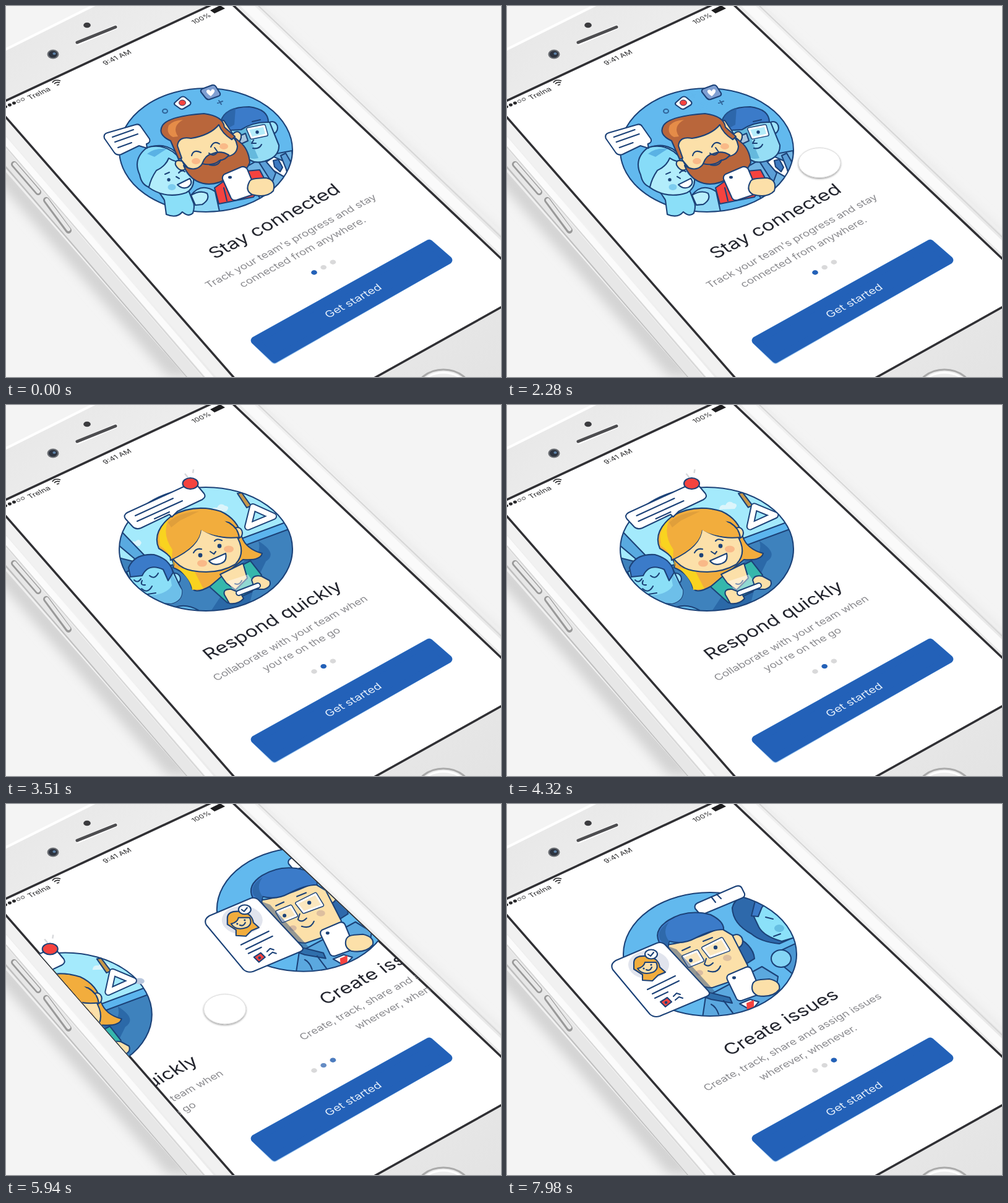
These frames come from a looping animation (800x600 px, 8 s). An HTML page:

```html
<!DOCTYPE html>
<html lang="en">
<head>
<meta charset="utf-8">
<title>Onboarding</title>
<style>
  html, body { margin: 0; width: 100%; height: 100%; overflow: hidden; background: #f4f4f4; }
  svg { display: block; width: 800px; height: 600px; }
  text { font-family: Inter, Roboto, sans-serif; text-anchor: middle; }
  .title { font-size: 31.5px; fill: #23252e; }
  .sub { font-size: 17.9px; fill: #8b8b8f; }
  .status { font-size: 12.6px; fill: #2a2a2c; }
  .ink { stroke: #1c4278; stroke-width: 2.1; stroke-linejoin: round; stroke-linecap: round; }
  .line { fill: none; }
  .dot { fill: #1c4278; }
  .skin { fill: #fce0a9; }
  .cheek { fill: #f9b988; }
  .navy { fill: #3b7bc9; }
  .brown { fill: #b9663b; }
  .gold { fill: #f2ad3d; }
  .pale { fill: #9fe5fa; }
  .white { fill: #fff; }
  .red { fill: #f5433f; }
  .rim { fill: none; stroke: #1c4278; stroke-width: 6; stroke-linejoin: round; }
  .frame { stroke: #fff; stroke-width: 3; stroke-linejoin: round; }
</style>
</head>
<body>
<svg viewBox="0 0 800 600">
  <defs>
    <linearGradient id="face" x1="0" y1="0" x2="1" y2="1">
      <stop offset="0" stop-color="#e6e6e6"/><stop offset=".4" stop-color="#f3f3f3"/><stop offset="1" stop-color="#e3e3e3"/>
    </linearGradient>
    <filter id="soft" x="-30%" y="-30%" width="160%" height="160%"><feGaussianBlur stdDeviation="9"/></filter>
    <filter id="lift" x="-30%" y="-30%" width="160%" height="170%">
      <feDropShadow dx="0" dy="1.5" stdDeviation="1.7" flood-color="#000" flood-opacity=".4"/>
    </filter>
    <clipPath id="screen"><path d="M-15 163 330 0H368L800 408V487L597 600H367Z"/></clipPath>
    <clipPath id="disc"><ellipse cx="323" cy="233" rx="140" ry="100"/></clipPath>
    <clipPath id="disc3"><ellipse cx="328" cy="243" rx="140" ry="100"/></clipPath>
    <path id="clerkLens" d="M391 199 417 194 421 208 397 213Z"/>
    <path id="heroLenses" d="M285 247 307 238 316 253 294 262ZM317 233 347 218 358 236 328 247Z"/>
    <path id="strapRing" d="M399 165 432 180 391 197Z"/>
  </defs>

  <!-- Phone body -->
  <path d="M-30 265 262 600H310L-30 220Z" fill="#d3d3d3" filter="url(#soft)"/>
  <path d="M395-8 820 386V412L395 16Z" fill="#e2e2e2" filter="url(#soft)"/>
  <path d="M-10 76 148-6H408L806 373V606H296L-10 257Z" fill="url(#face)"/>
  <g fill="none">
    <path d="M-6 73 148-4" stroke="#fff" stroke-width="4"/>
    <path d="M-5 254 299 606" stroke="#bfbfbf" stroke-width="4"/>
    <path d="M-5 239 310 606" stroke="#e7e7e7" stroke-width="18"/>
    <path d="M-5 222 325 606" stroke="#d6d6d6" stroke-width="2"/>
    <path d="M-5 213 334 606" stroke="#fbfbfb" stroke-width="10"/>
    <path d="M-5 190 357 606" stroke="#f1f1f1" stroke-width="18"/>
    <path d="M384-6 806 396" stroke="#fafafa" stroke-width="16"/>
    <path d="M402-6 806 379" stroke="#d6d6d6" stroke-width="2"/>
    <path d="M408-6 806 373" stroke="#efefef" stroke-width="4"/>
    <g stroke-linecap="round">
      <path d="M13 256 52 301M65 314 101 363" stroke="#999" stroke-width="10"/>
      <path d="M14 256 52 300M66 314 101 361" stroke="#e9e9e9" stroke-width="6"/>
      <path d="M116 60 177 34" stroke="#fff" stroke-width="7"/>
      <path d="M115 59 177 34" stroke="#4d4d50" stroke-width="5"/>
    </g>
  </g>
  <ellipse cx="76" cy="78" rx="9.5" ry="7.5" fill="#6a6d72"/>
  <ellipse cx="76" cy="78" rx="7" ry="5.6" fill="#2d333f"/>
  <ellipse cx="78" cy="77" rx="2.6" ry="2" fill="#5e82a8"/>
  <ellipse cx="131" cy="31" rx="5.8" ry="4.3" fill="#3b3b3e"/>
  <ellipse cx="707" cy="624" rx="45" ry="36" fill="#ededed" stroke="#aaa" stroke-width="3"/>
  <ellipse cx="707" cy="626" rx="41" ry="33" fill="none" stroke="#fff" stroke-width="3"/>
  <path d="M-15 163-15 160 345-8H360L806 414V484L591 604H371Z" fill="#fff" stroke="#303034" stroke-width="3.5"/>

  <!-- Status bar -->
  <g class="status">
    <g fill="#2a2a2c"><ellipse cx="-1" cy="163" rx="3" ry="2.4"/><ellipse cx="6" cy="160" rx="3" ry="2.4"/><ellipse cx="13" cy="157" rx="3" ry="2.4"/></g>
    <g fill="none" stroke="#2a2a2c" stroke-width=".8"><ellipse cx="20" cy="154" rx="2.8" ry="2.2"/><ellipse cx="27" cy="151" rx="2.8" ry="2.2"/></g>
    <text transform="matrix(.905 -.425 .6 .62 56 144)" font-size="13">Trelna</text>
    <g fill="none" stroke="#2a2a2c" stroke-width="1.7"><path d="M75 124Q78 118 88 121M78 126Q81 122 87 124"/><path d="M82 128 86 127"/></g>
    <text transform="matrix(.905 -.425 .6 .62 182 86)">9:41 AM</text>
    <text transform="matrix(.905 -.425 .6 .62 318 23)" font-size="12">100%</text>
    <path d="M330 7 346-1 354 4 337 12Z" fill="#1d1d1f"/>
  </g>

  <g clip-path="url(#screen)">
    <!-- Page 1 -->
    <g class="art">
      <ellipse cx="323" cy="233" rx="140" ry="100" fill="#62b9ee"/>
      <g clip-path="url(#disc)">
        <path class="ink" d="M385 262 420 242 462 234 470 290 420 330Z" fill="#72b5e4"/>
        <path class="ink white" d="M415 256 433 244 451 252 456 280Z"/>
        <path class="ink" d="M432 250 440 248 447 261 443 268 434 260Z" fill="#3d7ac1"/>
        <path class="ink" d="M409 253 419 250 436 270 430 286ZM444 242 452 238 466 262 456 272Z" fill="#5b9fd8"/>
        <path class="ink" d="M299 306Q315 285 338 300L345 332 290 335Z" fill="#8ed8f6"/>
      </g>
      <ellipse class="ink line" cx="323" cy="233" rx="140" ry="100"/>
      <!-- Man with glasses -->
      <g id="clerk">
        <ellipse class="ink pale" cx="430" cy="197" rx="9" ry="10"/>
        <path class="ink" d="M360 198Q395 179 426 188L441 225Q442 244 418 251 395 257 386 240Z" fill="#96def5"/>
        <path d="M366 200 386 194 408 246Q395 250 386 240Z" fill="#65b9dd"/>
        <path class="ink navy" d="M347 187Q354 163 393 163 424 167 424 188 400 187 380 200L362 201Z"/>
        <path d="M348 186Q354 167 371 165L369 192 360 197Z" fill="#275f9f" opacity=".7"/>
        <use href="#clerkLens" class="rim"/>
        <use href="#clerkLens" class="frame" fill="#b5edfa"/>
        <path class="ink" d="M373 212 387 206 391 218 378 224Z" fill="#a9c6de"/>
        <circle class="dot" cx="406" cy="204" r="2.7"/>
        <path class="ink line" d="M398 187 411 184M400 217 397 222 404 222M399 230Q409 232 413 224"/>
      </g>
      <!-- Woman -->
      <g id="friend">
        <path class="ink" d="M224 283Q245 294 256 314L259 337Q276 344 285 333 295 342 302 335 306 323 302 316L280 260Z" fill="#8bdff8"/>
        <path class="ink" d="M299 306Q314 297 325 303 330 313 317 321L306 322Z" fill="#b9effc"/>
        <path class="ink" d="M217 270Q207 245 228 230 258 218 278 240L298 262Q311 291 291 302 258 313 230 293Z" fill="#b2edfb"/>
        <path class="ink" d="M216 273Q204 247 228 229 250 222 270 236L288 252Q273 253 263 246 258 259 243 266 234 279 231 293 219 289 216 273Z" fill="#87dcf8"/>
        <path d="M228 239Q240 229 260 231L252 236 240 244Z" fill="#5ab2e4"/>
        <ellipse cx="268" cy="293" rx="6.5" ry="5" fill="#7cccef"/><ellipse cx="297" cy="269" rx="6" ry="5" fill="#7cccef"/>
        <circle class="dot" cx="263" cy="281" r="2.7"/>
        <path class="ink white" d="M277 289 297 279Q303 287 294 293 285 297 277 289Z"/>
        <path class="ink line" d="M279 270Q284 264 289 268M275 276 280 279M257 272 264 269"/>
      </g>
      <!-- Bearded man -->
      <g>
        <path class="ink red" d="M344 320 337 294 354 282 388 267 410 265 419 282 400 309Z"/>
        <path class="ink line" d="M352 294 357 315"/>
        <path class="ink skin" d="M285 251Q272 247 274 257 281 270 291 263Z"/>
        <path class="ink skin" d="M264 210Q290 193 352 185L382 230 365 270 306 276 284 250Z"/>
        <path class="ink skin" d="M365 209Q374 198 380 208 381 217 374 222Z"/>
        <path class="ink brown" d="M266 218Q244 208 253 193 263 178 320 174 351 178 353 196L370 211 365 216Q349 206 344 192 330 209 299 214 279 210 277 226L284 246 279 248Z"/>
        <path d="M270 212Q258 206 263 193 270 185 286 184 267 195 278 211Z" fill="#e58c48"/>
        <path class="ink brown" d="M287 258Q304 269 315 258L324 246Q336 238 344 239 354 234 358 243 373 241 374 227L370 213 378 220Q392 231 394 253 387 273 360 278 331 295 308 283 294 276 287 258Z"/>
        <path class="ink brown" d="M317 255Q322 241 333 239 347 233 360 241 356 248 345 250 335 259 317 255Z"/>
        <path class="ink line" d="M329 257Q343 260 347 249"/>
        <path class="ink line" d="M328 238Q335 245 342 236L337 229"/>
        <path class="ink line" d="M300 242Q303 231 315 237M331 228Q336 217 345 223"/>
        <ellipse class="cheek" cx="307" cy="251" rx="7" ry="5"/><ellipse class="cheek" cx="352" cy="227" rx="7" ry="5"/>
        <path class="ink white" d="M353 272 381 260Q387 259 390 264L404 298Q404 304 399 305L372 314Q365 315 363 309L350 280Q349 275 353 272Z"/>
        <ellipse class="dot" cx="362" cy="277" rx="3" ry="2.3"/>
        <path class="ink skin" d="M393 285Q386 299 398 305 421 311 432 299 437 281 420 278L404 279Q394 280 393 285Z"/>
      </g>
      <g id="bubble">
        <path class="ink white" d="M164 205 209 192Q215 190 218 195L232 215Q234 221 227 223L228 230 215 226 186 240Q179 242 175 237L159 214Q157 207 164 205Z"/>
        <path class="ink line" d="M172 212 206 200M176 220 213 207M181 229 203 221"/>
      </g>
      <path class="ink white" d="M273 156 282 148Q286 145 290 148L297 154Q300 157 297 160L287 166Q283 168 280 165L273 160Q271 158 273 156Z"/>
      <ellipse class="red" cx="285" cy="156.5" rx="5.5" ry="4.5" stroke="#273b6b"/>
      <path class="ink" d="M317 134 333 128Q337 127 339 130L346 141Q347 145 343 146L329 151Q325 152 322 148L315 139Q314 136 317 134Z" fill="#7f9fd2"/>
      <path class="white" d="M331 146Q321 139 325 136 328 134 331 138 332 133 336 135 340 138 331 146Z"/>
      <g id="sparksA" class="ink line" stroke-width="1.4"><ellipse cx="257" cy="170" rx="4" ry="3.2"/><path d="M342 157 350 154M344 153 348 159"/></g>
      <g id="sparksB">
        <path class="ink line" d="M297 146 305 143M299 142 303 148"/>
        <text transform="matrix(.905 -.425 .6 .62 319 165)" font-size="18" fill="#387ab7" opacity=".65">@</text>
      </g>
    </g>

    <!-- Page 2 -->
    <g class="art">
      <ellipse cx="323" cy="233" rx="140" ry="100" fill="#a4eafc"/>
      <g clip-path="url(#disc)">
        <path id="cloud" d="M331 173Q332 164 341 166 346 157 354 163 363 164 356 172Z" fill="#dcf5fb"/>
        <path id="cloudLeft" d="M202 227Q202 219 209 221 215 214 219 223L216 228Z" fill="#dcf5fb"/>
        <path class="ink" d="M170 244 250 264 370 230 470 195V350H170Z" fill="#3e82bd"/>
        <path class="ink" d="M370 220 470 183V196L370 233Z" fill="#5cb5ee"/>
        <path class="ink" d="M187 205 244 264H226L180 225Z" fill="#59aae0"/>
        <path d="M385 252Q415 245 408 220 440 240 420 253L402 290 390 335H330Z" fill="#2b69a8"/>
        <path class="ink" d="M262 333Q285 317 311 332V340H260Z" fill="#5fb3e5"/>
        <ellipse class="ink pale" cx="273" cy="281" rx="9" ry="9"/>
        <path class="ink" d="M195 270Q230 249 266 261L284 299Q286 316 267 321 225 321 203 288Z" fill="#8bdff7"/>
        <path d="M263 265 284 299Q286 316 267 321 235 320 222 308 258 309 268 292Z" fill="#6dbfe9"/>
        <path class="ink navy" d="M198 263Q208 240 239 242 265 249 270 271L262 284 254 266Q230 255 220 276L201 278Z"/>
        <path class="ink line" d="M207 283Q213 289 218 281M232 276Q240 283 246 272M220 284Q216 292 225 291M219 297Q229 306 236 293M229 306 242 304"/>
      </g>
      <ellipse class="ink line" cx="323" cy="233" rx="140" ry="100"/>
      <ellipse id="smudge" cx="443" cy="179" rx="8" ry="5" fill="#b9c7dd"/>
      <!-- Strap -->
      <g id="strap">
        <path class="ink" d="M374 143 381 142 396 163 389 166Z" fill="#c69648"/>
        <use href="#strapRing" fill="none" stroke="#1c4278" stroke-width="12" stroke-linejoin="round"/>
        <use href="#strapRing" fill="none" stroke="#fff" stroke-width="8" stroke-linejoin="round"/>
      </g>
      <!-- Woman with phone -->
      <g>
        <path class="ink gold" d="M247 232Q235 205 268 179 305 159 347 172 375 185 381 213 388 233 414 240 411 252 383 250L330 293Q302 309 299 291 293 272 270 263 275 248 247 232Z"/>
        <path d="M249 228Q240 205 266 184 253 211 271 232L270 261Q276 247 249 228ZM277 263Q300 284 301 299L319 297 304 268Z" fill="#f9d31f"/>
        <path class="ink" d="M329 294 351 275 395 252 413 275 397 302 358 320Z" fill="#35b7ac"/>
        <path class="ink skin" d="M346 274 383 256 390 280 371 299 356 288Z"/>
        <path class="ink line" d="M370 289Q377 292 381 284"/>
        <ellipse class="ink skin" cx="374" cy="207" rx="8" ry="9"/>
        <path class="ink skin" d="M269 248Q275 210 316 200 352 198 371 209 390 239 370 258 341 275 301 268 282 265 269 248Z"/>
        <path class="ink gold" d="M266 251Q260 217 288 198 319 180 360 190 375 199 377 214 340 218 315 200 314 229 266 251Z"/>
        <path d="M247 222Q243 200 268 181 300 165 330 169L372 202 374 212Q340 216 315 202 313 227 270 248Z" fill="#f2ad3d"/>
        <path d="M249 224Q243 202 262 186 252 210 269 234L268 248Z" fill="#f9d31f"/>
        <path d="M262 190Q280 173 312 172L281 187 267 198Z" fill="#d6973b" opacity=".6"/>
        <circle class="dot" cx="314" cy="243" r="3.4"/><circle class="dot" cx="345" cy="228" r="3.4"/>
        <ellipse class="cheek" cx="317" cy="256" rx="8" ry="5.5"/><ellipse class="cheek" cx="360" cy="233" rx="8" ry="5.5"/>
        <path class="ink white" d="M328 252 355 240Q358 254 345 257 334 260 328 252Z"/>
        <path class="ink line" d="M330 237 336 241 339 237M303 239Q307 231 316 233M337 220Q341 215 349 219"/>
        <path d="M358 285 391 274 403 291 370 304Z" fill="#fff" opacity=".45"/>
        <path class="ink skin" d="M353 307Q350 297 364 298L379 304 384 313Q375 323 361 321ZM397 283Q400 274 413 277L426 284Q430 294 417 298L402 298Z"/>
        <path d="M376 304 407 292" stroke="#1c4278" stroke-width="10" stroke-linecap="round"/>
        <path d="M376 304 407 292" stroke="#fff" stroke-width="6" stroke-linecap="round"/>
      </g>
      <g id="notice">
        <path class="ink white" d="M196 174 296 128Q304 125 309 130L320 143Q324 149 317 153L277 172 268 181 264 177 218 199Q210 202 205 197L193 184Q189 178 196 174Z"/>
        <path class="ink line" d="M209 179 270 151M212 188 285 155M240 184 264 173"/>
        <ellipse class="ink red" cx="298" cy="127" rx="12.5" ry="9"/>
        <path d="M289 111 294 117M303 104 302 110" stroke="#d8d9dc" stroke-width="2.5"/>
      </g>
    </g>

    <!-- Page 3 -->
    <g class="art">
      <ellipse cx="328" cy="243" rx="140" ry="100" fill="#62b9ee"/>
      <g clip-path="url(#disc3)">
        <g id="peer">
          <path class="ink" d="M364 168Q370 147 392 151L430 170 465 215 440 226Q410 223 395 210 365 194 364 168Z" fill="#2e69ab"/>
          <path class="ink" d="M397 178 410 163 440 154 480 190 478 212 444 222Q415 214 407 199Z" fill="#8be1f9"/>
          <path class="ink navy" d="M395 181 402 153 430 151 412 167 406 182Z"/>
          <ellipse cx="440" cy="201" rx="8" ry="6" fill="#67bfe3"/>
          <path class="ink line" d="M418 183 430 186M438 179Q443 188 450 183M431 214 442 210"/>
          <path class="ink" d="M438 239 474 222V285L446 262Z" fill="#4b97d3"/>
          <ellipse class="ink" cx="443" cy="250" rx="16" ry="14" fill="#84d5f5"/>
        </g>
        <path class="ink" d="M315 352 321 312 370 286 412 263 438 279 430 335Z" fill="#5ba8df"/>
        <path class="ink" d="M290 302 324 304 360 313 364 322 330 316Z" fill="#2f6fac"/>
        <path class="ink white" d="M376 323 393 316 407 320 395 334Z"/>
        <path class="red" d="M387 322 399 317 399 330 388 334Z"/>
        <path class="ink line" d="M330 324Q338 328 342 340M350 318 365 338"/>
      </g>
      <ellipse class="ink line" cx="328" cy="243" rx="140" ry="100"/>
      <!-- Ticket -->
      <path class="ink white" d="M308 160 370 133Q376 131 379 135L384 145Q385 150 380 152L320 177Q313 180 310 176L304 169Q302 163 308 160Z"/>
      <path class="ink line" d="M330 150 337 159M339 146 346 153"/>
      <!-- Man with card -->
      <g>
        <path class="ink" d="M365 212Q398 227 400 250L386 259Z" fill="#2e69ab"/>
        <ellipse class="ink skin" cx="371" cy="222" rx="10" ry="11"/>
        <path class="ink skin" d="M258 228Q300 222 344 200L364 212 389 261Q389 278 364 286L332 297Q311 298 294 279Z"/>
        <path class="ink navy" d="M246 224Q236 204 261 188 292 169 329 179 351 190 350 203 330 203 304 217 284 228 262 222L260 234Z"/>
        <path d="M247 219Q241 203 262 191 250 206 262 222L258 231Z" fill="#2e69ab"/>
        <g id="glasses">
          <use href="#heroLenses" class="rim"/>
          <use href="#heroLenses" class="frame" fill="#fbe7bf"/>
          <path class="ink line" d="M283 237 296 231M317 222 332 216"/>
          <circle class="dot" cx="297" cy="253" r="3"/><circle class="dot" cx="337" cy="232" r="3.2"/>
        </g>
        <path class="ink line" d="M322 250 319 259Q325 265 333 257M325 270Q340 275 345 262"/>
        <ellipse cx="311" cy="273" rx="6" ry="4.5" fill="#d9bba0"/><ellipse cx="356" cy="249" rx="7" ry="5" fill="#ddbf9f"/>
        <path d="M252 227 274 235 336 303 322 311Z" fill="#33527e" opacity=".5"/>
        <path class="ink white" d="M176 253 242 225Q250 222 256 228L325 302Q330 308 323 311L247 343Q238 346 231 340L171 268Q166 259 176 253Z"/>
        <ellipse cx="229" cy="260" rx="33" ry="23" fill="#e1e4ed"/>
        <path class="ink gold" d="M205 257Q205 245 224 246 245 248 247 264L256 272 244 277 235 286 219 285 219 276 205 267Z"/>
        <path class="ink skin" d="M211 266Q221 264 223 256 233 256 241 256 246 267 236 272 219 278 211 266Z"/>
        <path class="ink line" d="M225 268Q231 271 234 264"/>
        <circle class="dot" cx="221" cy="266" r="1.6"/><circle class="dot" cx="233" cy="260" r="1.6"/>
        <ellipse class="ink white" cx="233" cy="243" rx="10" ry="7.5"/>
        <path class="ink line" d="M228 243 232 246 237 240M227 300 272 278M235 307 278 286M239 314 260 304M269 311 274 306 280 308M272 317 278 312 284 314"/>
        <path class="ink red" d="M248 320 259 313 266 320 256 328Z"/><circle class="dot" cx="257" cy="321" r="2.3"/>
        <path class="ink white" d="M358 276 386 264Q392 262 395 267L409 301Q410 307 404 309L379 318Q372 319 370 313L356 284Q354 279 358 276Z"/>
        <ellipse class="dot" cx="367" cy="281" rx="3" ry="2.4"/>
        <path class="ink skin" d="M397 291Q393 304 405 310 429 314 440 300 443 287 424 283L410 284Q399 285 397 291Z"/>
      </g>
    </g>

    <g id="copy"></g>

    <g id="dots"></g>
    <path d="M402 541 684 384 715 411 434 572Z" fill="#9ac4ec" stroke="#9ac4ec" stroke-width="13" stroke-linejoin="round"/>
    <path d="M402 541 684 384 715 411 434 571Z" fill="#2361b8" stroke="#2361b8" stroke-width="12.5" stroke-linejoin="round"/>
    <text transform="matrix(.875 -.484 .61 .63 565 481)" font-size="19" fill="#e3eefb">Get started</text>
    <ellipse id="touch" cx="505" cy="253.5" rx="34" ry="24" fill="#fff" stroke="#d9d9d9" filter="url(#lift)"/>
  </g>
</svg>
<script>
  const LOOP = 8000, ART_STEP = 380, COPY_STEP = 390, SLIDES = [2490, 5730], SLIDE_TIME = 373;
  const NS = 'http://www.w3.org/2000/svg';
  const byId = id => document.getElementById(id);
  const add = (parent, tag, attrs, text = '') => {
    const el = parent.appendChild(document.createElementNS(NS, tag));
    for (const key in attrs) el.setAttribute(key, attrs[key]);
    el.textContent = text;
    return el;
  };

  // Each line: words, class, middle of its baseline.
  const pages = [
    [['Stay connected', 'title', 440, 355], ["Track your team's progress and stay", 'sub', 464, 384], ['connected from anywhere.', 'sub', 483, 402]],
    [['Respond quickly', 'title', 437, 355], ['Collaborate with your team when', 'sub', 463, 381], ["you're on the go", 'sub', 481, 399]],
    [['Create issues', 'title', 449, 360], ['Create, track, share and assign issues', 'sub', 465, 389], ['wherever, whenever.', 'sub', 490, 406]]
  ];
  const arts = document.querySelectorAll('.art');
  const copies = pages.map(lines => {
    const group = add(byId('copy'), 'g');
    for (const [words, cls, x, y] of lines)
      add(group, 'text', { class: cls, transform: `matrix(.882 -.472 .607 .64 ${x} ${y})` }, words);
    return group;
  });
  const dots = pages.map((_, i) => {
    const spot = { cx: 498 + 15.2 * i, cy: 431 - 8.4 * i, rx: 4.8, ry: 3.7 };
    add(byId('dots'), 'ellipse', { ...spot, fill: '#d9d9da' });
    return add(byId('dots'), 'ellipse', { ...spot, fill: '#2361b8' });
  });

  const ramp = (t, from, to) => Math.min(1, Math.max(0, (t - from) / (to - from)));
  const ease = p => p * p * (3 - 2 * p);
  const wave = (t, period, shift = 0) => Math.sin(2 * Math.PI * (t / period + shift));
  const move = (el, x, y) => el.setAttribute('transform', `translate(${x} ${y})`);
  const fade = (el, value) => el.setAttribute('opacity', value);

  function draw(t) {
    const progress = SLIDES.map(start => ease(ramp(t, start, start + SLIDE_TIME)));
    const position = progress[0] + progress[1];
    pages.forEach((_, i) => {
      const away = i - position;
      move(arts[i], away * ART_STEP, -0.473 * away * ART_STEP);
      move(copies[i], away * COPY_STEP, -0.525 * away * COPY_STEP);
      fade(dots[i], Math.sqrt(Math.max(0, 1 - Math.abs(away))));
    });

    const second = t > 4200 ? 1 : 0, start = SLIDES[second];
    const drag = 253 * progress[second];
    move(byId('touch'), -drag, 0.517 * drag);
    fade(byId('touch'), ramp(t, start - 650, start - 240) * (1 - ramp(t, start + 240, start + 440)));

    const glow = 0.5 + 0.5 * wave(t, 2350, 0.25);
    fade(byId('sparksA'), 0.7 * glow);
    fade(byId('sparksB'), 1 - glow);
    move(byId('bubble'), 0.7 - 0.7 * wave(t, 3000, 0.25), 0);
    move(byId('friend'), 0, 0.5 * wave(t, 2350));
    move(byId('clerk'), 0, 0.4 * wave(t, 2350));

    const ride = t - 3510;
    move(byId('cloud'), ride * 0.0148, -ride * 0.005);
    move(byId('cloudLeft'), -ride * 0.015, ride * 0.004);
    fade(byId('smudge'), ramp(t, 4500, 5000));
    byId('strap').setAttribute('transform', `rotate(${-1.8 + 1.8 * wave(ride, 3180, 0.25)} 376 142)`);
    move(byId('notice'), 0.5 - 0.5 * wave(ride, 3180, 0.25), 0);

    const sway = wave(t - 7980, 2400);
    move(byId('peer'), sway, -1.5 * sway);
    move(byId('glasses'), 0.4 * sway, -0.2 * sway);
  }

  const began = performance.now();
  function tick() {
    draw((performance.now() - began) % LOOP);
    requestAnimationFrame(tick);
  }
  tick();
</script>
</body>
</html>
```
